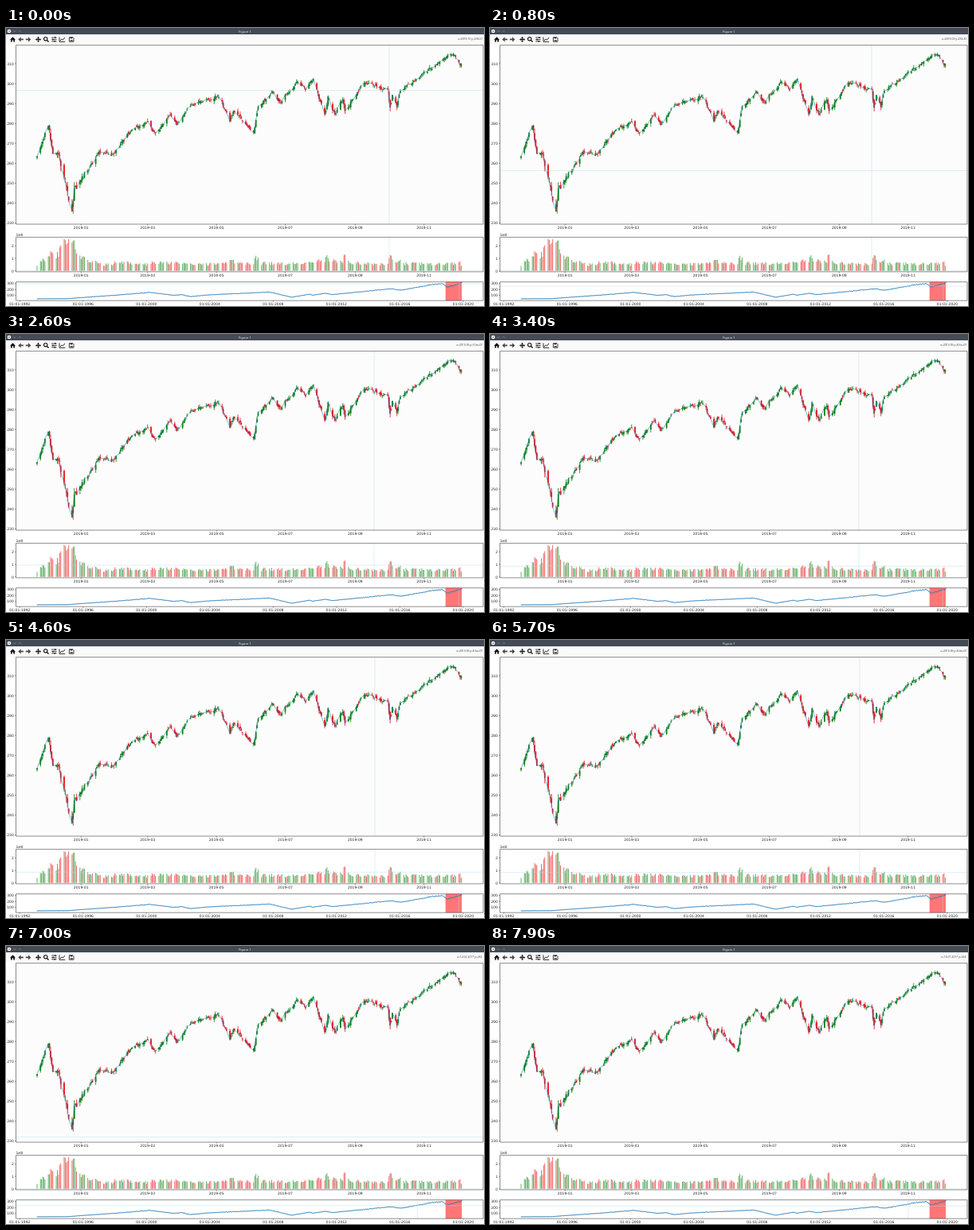
An HTML page that plays this animation: 600x350 px, repeating every 8000 ms.

```html
<!DOCTYPE html>
<html lang="en">
<head>
<meta charset="utf-8">
<title>Figure 1</title>
<style>
html, body { margin: 0; width: 100%; height: 100%; overflow: hidden; background: #fff; }
svg { display: block; width: 600px; height: 350px; }
text { font: 4.5px "DejaVu Sans", sans-serif; fill: #222; }
.title { font: 4.2px "Noto Sans", sans-serif; fill: #e4e6e8; }
.status { font: 3.35px "Noto Sans", sans-serif; fill: #444; }
.end { text-anchor: end; }
.mid { text-anchor: middle; }
.line { fill: none; stroke: #1f77b4; stroke-linejoin: round; }
.frame { fill: none; stroke: #000; stroke-width: .45; }
.cursor { fill: none; stroke: #add8e6; stroke-width: .6; opacity: .7; }
.icon { fill: none; stroke: #151515; stroke-width: 1.1; }
.solid { fill: #151515; }
.arrow { fill: #484848; }
</style>
</head>
<body>
<svg id="stage" viewBox="0 0 600 350">
  <rect width="600" height="350" fill="#fff"/>
  <rect x="12.5" y="21.6" width="586.5" height="225.4" fill="#fcfcfc"/>
  <rect y="8" width="600" height="12.5" fill="#fafafa"/>
  <rect width="600" height="8" fill="#444b55"/>
  <circle cx="4" cy="4" r="2.3" fill="#fcfcfc"/>
  <path d="M3 3l2 2m0-2l-2 2" stroke="#444b55" stroke-width=".5"/>
  <path d="M9.3 3.4l1.5 1.5 1.5-1.5M15.9 4.7l1.5-1.5 1.5 1.5" fill="none" stroke="#aeb3b9" stroke-width=".5"/>
  <text class="title mid" x="300" y="5.6">Figure 1</text>
  <path class="solid" d="M5 14.7L8.5 11.2 12 14.7H11V17.6H9.3V15.3H7.7V17.6H6V14.7Z"/>
  <path class="arrow" d="M15.3 14.4L18.6 11.2V13.6H21.8V15.2H18.6V17.6Z"/>
  <path class="arrow" d="M31.3 14.4L28 11.2V13.6H24.8V15.2H28V17.6Z"/>
  <path class="solid" d="M40.5 10.8l1.5 1.8h-3zM40.5 18l1.5-1.8h-3zM36.9 14.4l1.8-1.5v3zM44.1 14.4l-1.8-1.5v3z"/>
  <g class="icon">
    <path d="M40.5 12v4.8M38.1 14.4h4.8"/>
    <circle cx="49.7" cy="13.7" r="2.2"/>
    <path d="M51.3 15.3l2.2 2.3" stroke-width="1.4"/>
    <path d="M57.2 12h6.4M57.2 14.4h6.4M57.2 16.8h6.4" stroke-width=".8"/>
    <path d="M61.8 11v2M59 13.4v2M61.2 15.8v2"/>
    <path d="M67 11.4V17.3H74.2M68 16l2-2.2 1.4 1.2 2.6-3.1" stroke-width=".9"/>
    <path d="M79.4 11.7H84L85 12.7V17.2H79.4Z" stroke-width=".8"/>
    <path d="M80.6 12.6h2.8M80.6 15.8h3.2" stroke-width="1.2"/>
  </g>
  <rect x="551.7" y="319.7" width="20.4" height="23.5" fill="#ff7676"/>
</svg>
<script>
const svg = document.getElementById('stage');
const LEFT = 12.5, RIGHT = 599, DAY = 1.416, YEAR = 19.88, LOOP = 8000;

// Top and bottom edges, and the linear scale of each panel.
const price = { top: 21.6, bottom: 247, zero: 245.5 + 2.507 * 230, unit: 2.507 };
const volume = { top: 263.4, bottom: 306.9, zero: 305.8, unit: 15.75 };
const history = { top: 319.7, bottom: 343.2, zero: 344.2, unit: .075 };
const panels = [price, volume, history];

const toY = (p, v) => p.zero - p.unit * v;
const fromY = (p, y) => (p.zero - y) / p.unit;
const dayX = d => 39 + DAY * d;
const yearX = y => 17.3 + YEAR * (y - 1992);
const pt = (x, y) => `${x.toFixed(2)} ${y.toFixed(2)}`;

function add(tag, attrs, text) {
  const el = document.createElementNS('http://www.w3.org/2000/svg', tag);
  for (const k in attrs) el.setAttribute(k, attrs[k]);
  if (text) el.textContent = text;
  svg.append(el);
  return el;
}
const label = (x, y, cls, text) => add('text', { x, y, class: cls }, text);

function seeded(seed) {
  return () => (seed = (seed * 16807) % 2147483647) / 2147483647;
}

// Linear interpolation through a flat list of x, y pairs.
function at(list, x) {
  let i = 0;
  while (i < list.length - 4 && list[i + 2] < x) i += 2;
  const k = Math.min(1, Math.max(0, (x - list[i]) / (list[i + 2] - list[i])));
  return list[i + 1] + (list[i + 3] - list[i + 1]) * k;
}

// Turning points: days since the first candle and price, then years and price.
const swings = [0, 263.3, 10, 279.5, 14, 264.5, 19, 265, 31, 235, 33, 246.5, 56, 266,
  67, 264, 84, 277.4, 98, 280.4, 105, 274.5, 118, 284, 124, 279.7, 136, 288.6, 161, 294,
  171, 281.5, 174, 287, 192, 274.8, 196, 287.7, 209, 295.5, 215, 290.7, 231, 300.7,
  238, 297.2, 245, 302, 255, 284, 258, 293.4, 264, 284.3, 271, 292.5, 273, 285.2,
  286, 297.8, 293, 301, 311, 296.5, 313, 288, 315, 294, 319, 288.7, 322, 296,
  343, 305.5, 369, 315.3, 375, 309.8];
const decades = [1993.08, 44, 1995, 46, 1998.5, 113, 2000.23, 152, 2001.72, 100, 2002.2, 115,
  2002.77, 80, 2004, 111, 2007.77, 156, 2009.18, 70, 2010.3, 120, 2010.5, 104,
  2011.3, 136, 2011.75, 113, 2015.4, 212, 2016.1, 187, 2018.07, 286, 2018.73, 293,
  2018.98, 236, 2019.92, 314];

// A winter surge plus extra trading whenever the price moves fast.
function traded(d) {
  const move = Math.min(3, Math.abs(at(swings, d) - at(swings, d - 1)));
  return .48 + 1.25 * Math.exp(-(((d - 27) / 13) ** 2)) + .2 * move;
}

function drawMarket() {
  const rand = seeded(4217);
  const noise = () => rand() * 2 - 1;
  const wicks = ['', ''], bodies = ['', ''], bars = ['', ''];
  const line = [];
  let last = 262.6;
  for (let d = 0; d <= 376; d++) {
    const weekday = (d + 5) % 7;
    if (weekday === 6 || weekday === 0) continue;
    const v = traded(d) * (1 + noise() * .22);
    const swing = .5 + v * .7;
    const close = at(swings, d) + noise() * .9 * swing;
    const open = last + (close - last) * .25 + noise() * swing;
    const high = Math.max(open, close) + rand() * 1.5 * swing;
    const low = Math.min(open, close) - rand() * 1.5 * swing;
    const up = close >= open ? 1 : 0;
    const x = dayX(d), y = p => toY(price, p);
    wicks[up] += `M${pt(x, y(low))}L${pt(x, y(high))}`;
    bodies[up] += `M${pt(x, y(open))}L${pt(x, y(close))}`;
    bars[up] += `M${pt(x, volume.zero)}L${pt(x, toY(volume, v))}`;
    line.push(pt(x, y(close)));
    last = close;
  }
  ['#ee0d14', '#0a800f'].forEach((stroke, i) => {
    add('path', { d: wicks[i], stroke, 'stroke-width': .8 });
    add('path', { d: bodies[i], stroke, 'stroke-width': 1.7 });
    add('path', { d: bars[i], stroke, 'stroke-width': 1, opacity: .62 });
  });
  add('path', { d: 'M' + line.join('L'), class: 'line', 'stroke-width': .55 });
}

function drawHistory() {
  const rand = seeded(93);
  const line = [];
  for (let y = 1993.08; y <= 2019.93; y += .04) {
    const p = at(decades, y) * (1 + (rand() - .5) * .06);
    line.push(pt(yearX(y), toY(history, p)));
  }
  add('path', { d: 'M' + line.join('L'), class: 'line', 'stroke-width': 1 });
}

function drawAxes() {
  let d = '';
  for (const p of panels) d += `M${LEFT} ${p.top}H${RIGHT}V${p.bottom}H${LEFT}Z`;
  const yTicks = (p, from, to, step) => {
    for (let v = from; v <= to; v += step) {
      const y = toY(p, v);
      d += `M${LEFT} ${y}h-1.3`;
      label(9.8, y + 1.7, 'end', String(v));
    }
  };
  const xTick = (p, x, text, gap) => {
    d += `M${x} ${p.bottom}v1.3`;
    label(x, p.bottom + gap, 'mid', text);
  };
  yTicks(price, 230, 310, 10);
  yTicks(volume, 0, 2, 1);
  yTicks(history, 100, 300, 100);
  for (let m = 0; m < 12; m += 2) {
    const day = (Date.UTC(2019, m, 1) - Date.UTC(2018, 10, 23)) / 864e5;
    const text = '2019-' + String(m + 1).padStart(2, '0');
    xTick(price, dayX(day), text, 6.2);
    xTick(volume, dayX(day), text, 6.2);
  }
  for (let y = 1992; y <= 2020; y += 4) xTick(history, yearX(y), '01-01-' + y, 5.3);
  label(LEFT, 261.8, '', '1e8');
  add('path', { d, class: 'frame' });
}

drawHistory();
drawMarket();
const cursor = add('path', { class: 'cursor' });
drawAxes();
const status = label(598.3, 15.2, 'status end', '');

// Pointer position over time in ms.
const pathX = [0, 480.9, 1800, 477, 2600, 462, 3400, 463, 4600, 463, 5700, 464,
  6500, 500, 7000, 516.65, 7900, 525.04];
const pathY = [0, 78.509, 1500, 268, 1800, 274.77, 2600, 290.995, 3400, 292.255,
  4600, 292.255, 5700, 292.57, 6500, 322, 7000, 326.8, 7900, 327.4];

function readout(panel, x, y) {
  const v = fromY(panel, y);
  if (panel === history) {
    const days = (x - 17.3) / YEAR * 365.25;
    const iso = new Date(Date.UTC(1992, 0, 1) + days * 864e5).toISOString();
    return `x=${iso.slice(0, 10).split('-').reverse().join('-')} y=${v.toFixed(0)}.`;
  }
  const month = new Date(Date.UTC(2018, 10, 23) + (x - 39) / DAY * 864e5).toISOString().slice(0, 7);
  if (panel === price) return `x=${month} y=${v.toFixed(2)}`;
  const n = Math.max(0, Math.round(v * 100));
  return `x=${month} y=${n >= 100 ? n / 100 + 'e+08' : n / 10 + 'e+07'}`;
}

// The pointer's data position is mirrored in every panel that contains it.
function show(t) {
  const x = at(pathX, t), rawY = at(pathY, t);
  const panel = rawY < volume.top ? price : rawY < history.top ? volume : history;
  const y = Math.min(rawY, panel.bottom);
  const value = fromY(panel, y) * (panel === volume ? 1e8 : 1);
  const day = panel === history ? ((x - 17.3) / YEAR - 26.893) * 365.25 : (x - 39) / DAY;
  const year = 2018.893 + day / 365.25;
  let d = '';
  for (const p of panels) {
    const px = p === history ? yearX(year) : dayX(day);
    const py = toY(p, p === volume ? value / 1e8 : value);
    if (px > LEFT && px < RIGHT) d += `M${px} ${p.top}V${p.bottom}`;
    if (py >= p.top && py <= p.bottom) d += `M${LEFT} ${py}H${RIGHT}`;
  }
  cursor.setAttribute('d', d);
  status.textContent = rawY > panel.bottom ? '' : readout(panel, x, y);
}

const start = performance.now();
function tick(now) {
  const t = Math.max(0, now - start) % LOOP;
  show(Math.floor(t / 100) * 100);
  requestAnimationFrame(tick);
}
show(0);
requestAnimationFrame(tick);
</script>
</body>
</html>
```
